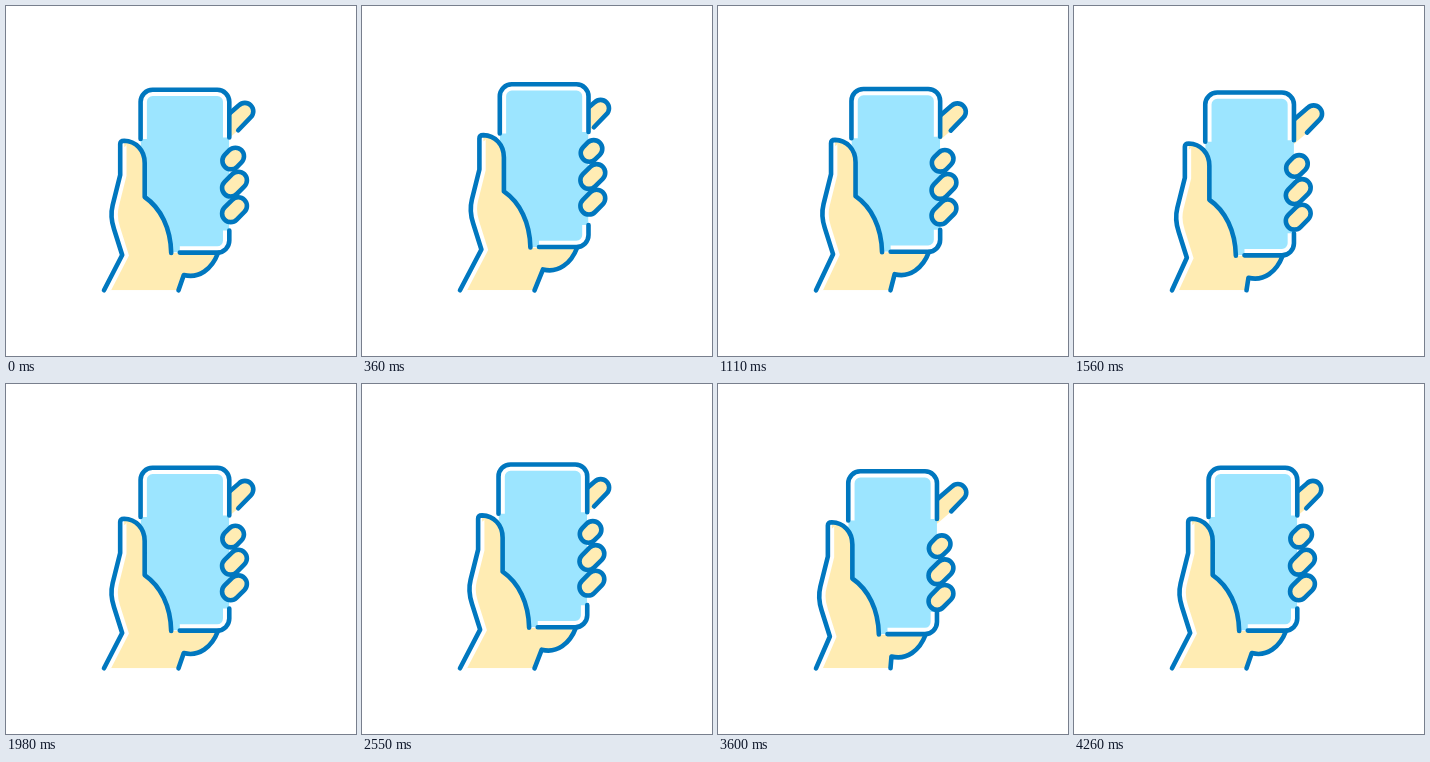
Write an HTML page that moves like this. It is 350 by 350 pixels and loops after 4.5 s.

```html
<!DOCTYPE html>
<html lang="en">
<head>
<meta charset="utf-8">
<title>Hand with phone</title>
<style>
  html, body { margin: 0; width: 100%; height: 100%; overflow: hidden; background: #fff; }
  svg { display: block; width: 100vw; height: 100vh; }
  .line { fill: none; stroke: #0077bf; stroke-width: 4.6; stroke-linecap: round; stroke-linejoin: round; }
  .shine { fill: none; stroke: #fff; stroke-width: 12.6; }
  .skin { fill: #ffecb3; }
  .screen { fill: #9ce5ff; }
</style>
</head>
<body>
<svg viewBox="0 0 350 350">
  <defs>
    <rect id="phoneShape" x="134.6" y="83.8" width="88.7" height="162.8" rx="12"/>
    <path id="phoneEdge" d="M134.6 133V95.8a12 12 0 0 1 12-12H211.3a12 12 0 0 1 12 12V131.5M223.3 224.5V234.6a12 12 0 0 1-12 12H173.8"/>
    <path id="handShape"/>
    <rect id="finger" class="line" style="fill:#ffecb3"/>
    <clipPath id="phoneClip"><use href="#phoneShape"/></clipPath>
    <clipPath id="handClip"><use href="#handShape"/></clipPath>
  </defs>
  <g id="index">
    <path id="indexFill" class="skin"/>
    <path id="indexLine" class="line"/>
  </g>
  <g id="body">
    <g clip-path="url(#phoneClip)">
      <use href="#phoneShape" class="screen"/>
      <use href="#phoneEdge" class="shine"/>
    </g>
    <g clip-path="url(#handClip)">
      <use href="#handShape" class="skin"/>
      <path id="handShine" class="shine"/>
    </g>
    <use href="#phoneEdge" class="line"/>
    <path id="handLine" class="line"/>
  </g>
  <g id="fingers"></g>
</svg>
<script>
const $ = id => document.getElementById(id);
const LOOP = 4500, CYCLE = 2280, STEP = 30;
const DELAY = 30, MOVE = 660;

// Offsets of each part from the resting pose.
const REST = { body: [0, 0], fingers: [0, 0], index: [0, 0] };
const HIGH = { body: [6.4, -11.1], fingers: [4.6, -15.2], index: [-0.6, -6] };
const LOW = { body: [-4.4, 3.6], fingers: [-5.6, 9.8], index: [1, 3.2] };
const POSES = [REST, HIGH, LOW, REST];

const ease = u => u * u * (3 - 2 * u);
const mix = (a, b, k) => a.map((v, i) => v + (b[i] - v) * k);
const setPath = (id, d) => $(id).setAttribute('d', d);
const shift = (id, [x, y]) => $(id).setAttribute('transform', `translate(${x} ${y})`);

// Three pills tilted by 45 degrees; the top one is shorter.
function buildFingers() {
  const r = 8.6;
  for (let i = 0; i < 3; i++) {
    const length = 2 * r + (i ? 10.8 : 6.2);
    const pill = document.createElementNS('http://www.w3.org/2000/svg', 'rect');
    const attributes = {
      class: 'line', style: 'fill:#ffecb3',
      x: -length / 2, y: -r, width: length, height: 2 * r, rx: r,
      transform: `translate(${i ? 228.5 : 227.2} ${152.5 + 25.6 * i}) rotate(-45)`
    };
    for (const [name, value] of Object.entries(attributes)) pill.setAttribute(name, value);
    $('fingers').append(pill);
  }
}

// The index finger's tail runs behind the phone.
function buildIndex() {
  const r = 8.4, d = r * Math.SQRT1_2, x = 238.9, y = 105.3;
  const line = `M${x - d - 15} ${y - d + 13}L${x - d} ${y - d}A${r} ${r} 0 0 1 ${x + d} ${y + d}l-12.6 13`;
  setPath('indexLine', line);
  setPath('indexFill', `${line}l-15 13Z`);
}

// The wrist ends stay in place while the rest of the hand moves.
function drawHand([dx, dy]) {
  const baseY = 284.3 - dy;
  const left = `M${98 - dx} ${baseY}L116.2 249L108 223C105 214 104.7 207 106.7 199L114.2 169V138Q114.2 134.7 118.2 134.7`;
  const thumb = 'C129.7 135 138.7 144 138.7 157V191C154.7 202 164.7 222 165.2 247';
  const heel = 'C206 263 193 273 177.8 269';
  const wrist = `L${172.5 - dx} ${baseY}`;
  setPath('handShape', `${left}${thumb}H212${heel}${wrist}Z`);
  setPath('handShine', left);
  setPath('handLine', `${left}${thumb}M212 247${heel}${wrist}`);
}

function render(ms) {
  const t = Math.floor(ms % LOOP / STEP) * STEP % CYCLE;
  const phase = Math.min(Math.max((t - DELAY) / MOVE, 0), 3);
  const i = Math.min(Math.floor(phase), 2);
  const part = name => mix(POSES[i][name], POSES[i + 1][name], ease(phase - i));

  drawHand(part('body'));
  for (const name of ['body', 'fingers', 'index']) shift(name, part(name));
}

buildFingers();
buildIndex();
$('finger').remove();

const start = performance.now();
function tick() {
  render(performance.now() - start);
  requestAnimationFrame(tick);
}
tick();
</script>
</body>
</html>
```
